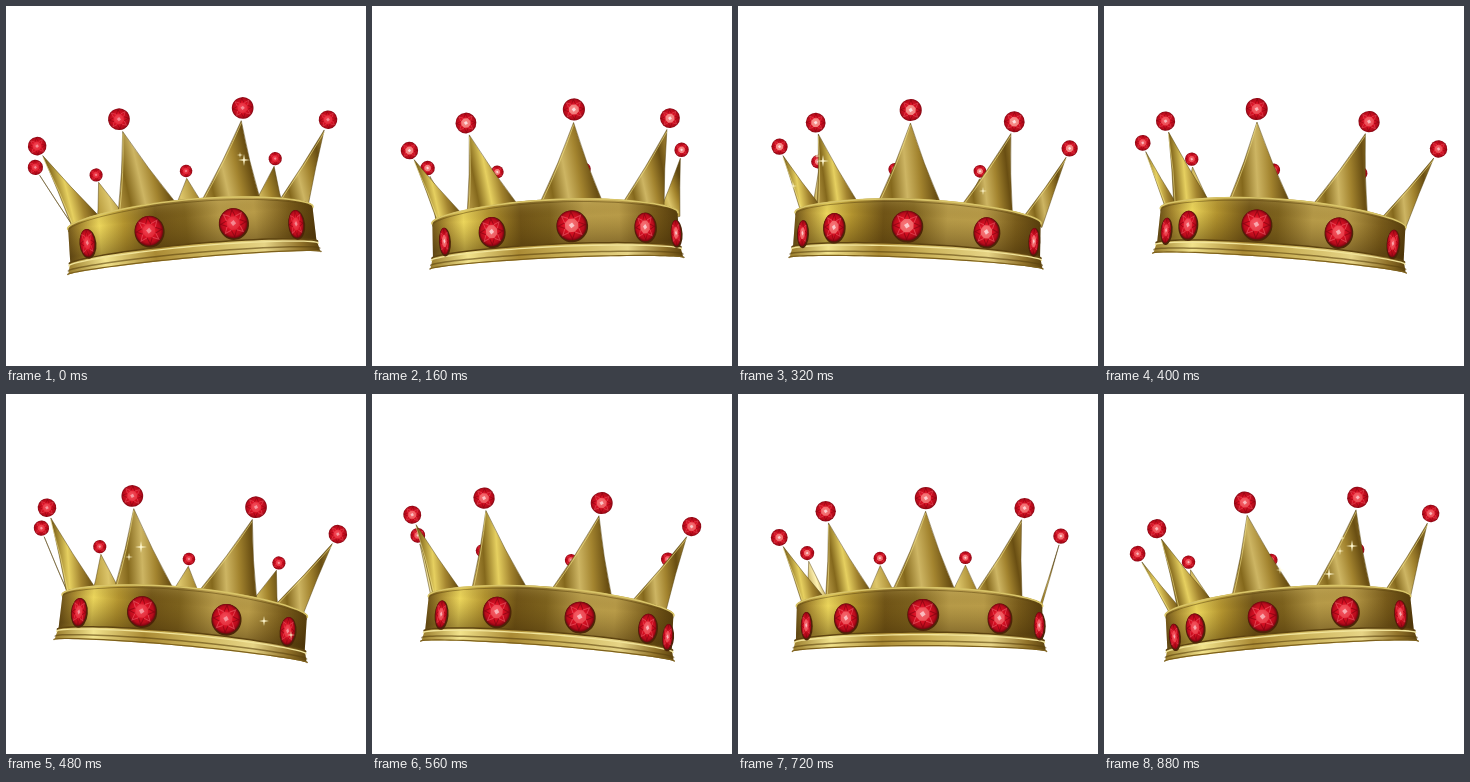
Animation, 360 px wide and 360 px high, one loop 0.96 s. Source, as an HTML page with a canvas:

```html
<!DOCTYPE html>
<html lang="en">
<head>
<meta charset="utf-8">
<title>Turning crown</title>
<style>
html, body { margin: 0; width: 100%; height: 100%; overflow: hidden; background: #fff; }
canvas { display: block; width: 360px; height: 360px; }
</style>
</head>
<body>
<canvas id="stage" width="360" height="360"></canvas>
<script>
const ctx = document.getElementById('stage').getContext('2d');
const STEP = 80, STEPS = 12, CX = 181.5, CY = 181;
const rad = d => d * Math.PI / 180;
const sin = d => Math.sin(rad(d)), cos = d => Math.cos(rad(d));

// [start angle, sweep] during half a loop; 0 faces the viewer
const SPIKES = [[180, 40], [-140, 40], [140, 80], [-100, 40], [60, 40], [-60, 40], [20, 40], [-20, 40]];
const GEMS = [100, 60, 20, -20, -60];
const GLINT = [.1, .35, .7, .7, .75, .4, .2, .5, 1, .6, .5, .4];
const SPARKS = {
  0: [[238, 154, 6], [234, 149, 3]],
  4: [[85, 155, 6], [79, 150, 3], [245, 185, 4], [55, 180, 4]],
  6: [[135, 153, 6], [123, 163, 4], [258, 227, 5], [285, 241, 4]],
  11: [[248, 152, 6], [236, 157, 4], [225, 180, 6], [238, 144, 3], [176, 176, 4]]
};

const near = a => 1 / (1 - .279 * cos(a));

// Point on a ring of the crown, seen from below
function ring(a, y, r, k = .05) {
  return [CX + r * sin(a) / (1 - k * cos(a)), y - .745 * (278 - y) * (near(a) - 1)];
}

function ramp(x0, y0, x1, y1, stops) {
  const g = ctx.createLinearGradient(x0, y0, x1, y1);
  stops.forEach(([at, c]) => g.addColorStop(at, c));
  return g;
}

function arc(y, r, back) {
  for (let i = -92; i <= 92; i += 4) ctx.lineTo(...ring(back ? -i : i, y, r));
}

function line(y, r, color, width) {
  ctx.beginPath();
  arc(y, r);
  ctx.strokeStyle = color;
  ctx.lineWidth = width;
  ctx.stroke();
}

function fillRing(y0, r0, y1, r1, fill) {
  ctx.beginPath();
  arc(y0, r0);
  arc(y1, r1, true);
  ctx.closePath();
  ctx.fillStyle = fill;
  ctx.fill();
}

function polygon(n, r, turn) {
  ctx.beginPath();
  for (let i = 0; i < n; i++) ctx.lineTo(r * cos(i * 360 / n + turn), r * sin(i * 360 / n + turn));
  ctx.closePath();
}

function ruby(x, y, rx, ry, glint, rim) {
  ctx.save();
  ctx.translate(x, y);
  ctx.scale(rx / 10, ry / 10);
  const g = ctx.createRadialGradient(-1, -1, 1, 0, 0, 10);
  g.addColorStop(0, '#ee3044');
  g.addColorStop(.5, '#d60f22');
  g.addColorStop(.82, '#b70c1c');
  g.addColorStop(1, rim);
  ctx.beginPath();
  ctx.arc(0, 0, 10, 0, 7);
  ctx.fillStyle = g;
  ctx.fill();
  ctx.lineWidth = .7;
  for (let i = 0; i < 8; i++) {
    const a = i * 45 + 22;
    ctx.beginPath();
    ctx.moveTo(5 * cos(a), 5 * sin(a));
    ctx.lineTo(9 * cos(a + 22), 9 * sin(a + 22));
    ctx.lineTo(5 * cos(a + 45), 5 * sin(a + 45));
    ctx.strokeStyle = i % 2 ? 'rgba(110,0,12,.5)' : 'rgba(255,120,130,.45)';
    ctx.stroke();
  }
  polygon(8, 4.8, 22);
  ctx.fillStyle = `rgba(255,${100 + 125 * glint},${105 + 95 * glint},${.2 + .6 * glint})`;
  ctx.fill();
  polygon(4, 2, 10);
  ctx.fillStyle = `rgba(255,255,255,${.35 + .5 * glint})`;
  ctx.translate(-1, -1);
  ctx.fill();
  ctx.restore();
}

function spike(a, sway, glint) {
  const back = cos(a) < -.1;
  const ball = ring(a, 143, 156, .15);
  ball[0] += sway * (3 - 11 * sin(a) + (back ? 0 : 3 * cos(a) - 6 * sin(2 * a)));
  ball[1] -= sway * 5.5 * sin(a) ** 3;

  // Spikes at the sides turn their broad face to the viewer
  const side = Math.max(0, 1 - 2 * Math.abs(cos(a)));
  const root = a - Math.sign(a) * 14 * side, half = 14.5 + 6 * side;
  const [l, m, r] = [-half, 0, half].map(d => {
    const q = ring(root + d, 215, 121);
    return [q[0] + sway * (4 - 3 * sin(2 * a)), q[1]];
  });
  const size = 8 * near(a);
  const len = Math.hypot(m[0] - ball[0], m[1] - ball[1]);
  const tip = ball.map((v, i) => v + (m[i] - v) * size * 1.18 / len);
  const bend = q => q.map((v, i) => (v + tip[i]) / 2 * .84 + (m[i] + tip[i]) / 2 * .16);

  ctx.beginPath();
  ctx.moveTo(...l);
  ctx.quadraticCurveTo(...bend(l), ...tip);
  ctx.quadraticCurveTo(...bend(r), ...r);
  ctx.closePath();
  const x0 = Math.min(l[0], r[0], tip[0]), x1 = Math.max(l[0], r[0], tip[0]);
  const mid = (l[1] + tip[1]) / 2;
  const bright = a < -25 && a > -130;
  ctx.fillStyle = ramp(x0, mid + 4, x1, mid - 4, back
    ? [[0, '#a98b2c'], [.4, bright ? '#fff3b4' : '#dcc56a'], [.7, '#a3842c'], [1, '#5f4710']]
    : [[0, '#a98c3a'], [.16, '#84681c'], [.4, bright ? '#e6d060' : '#cdb563'],
       [.62, '#a3842f'], [.85, '#694e12'], [1, '#8f7228']]);
  ctx.fill();
  ctx.lineWidth = .8;
  ctx.strokeStyle = 'rgba(84,65,14,.6)';
  ctx.stroke();
  if (!back) {
    ctx.beginPath();
    ctx.moveTo(l[0] + 1.5, l[1]);
    ctx.quadraticCurveTo(bend(l)[0] + 1.5, bend(l)[1], tip[0], tip[1] + 2);
    ctx.strokeStyle = 'rgba(240,225,140,.75)';
    ctx.stroke();
  }
  ruby(...ball, size, size, glint, '#840713');
}

function band() {
  fillRing(212, 123, 250, 124, ramp(58, 0, 305, 0, [
    [0, '#70551a'], [.05, '#a5872f'], [.13, '#ecd65c'], [.23, '#b3942f'], [.36, '#6f5316'],
    [.48, '#7c611d'], [.62, '#b69a48'], [.76, '#b89b48'], [.9, '#775a1a'], [1, '#553c0c']]));
  fillRing(212, 123, 250, 124, ramp(0, 190, 0, 252, [
    [0, 'rgba(255,235,150,.3)'], [.35, 'rgba(90,64,10,0)'], [.8, 'rgba(62,40,4,.38)'], [1, 'rgba(62,40,4,.2)']]));
  line(212.5, 123, '#d9c568', 1.6);
  line(214.5, 122.5, 'rgba(92,68,15,.5)', 1);
  fillRing(247, 124.5, 258, 127, ramp(55, 0, 309, 0, [
    [0, '#9a7d2c'], [.15, '#f2e38c'], [.35, '#aa8a34'], [.55, '#cdb55c'],
    [.78, '#e6d486'], [.92, '#92732a'], [1, '#5a400c']]));
  line(247, 124.5, '#5e4410', 1.5);
  line(249, 125, '#f1e49a', 1.3);
  line(254, 126, 'rgba(92,68,14,.6)', 1.5);
  line(257.5, 127, '#7d601c', 1.2);
}

function spark(x, y, r) {
  ctx.beginPath();
  for (let i = 0; i < 8; i++) {
    const d = i % 2 ? r * .2 : r;
    ctx.lineTo(x + d * cos(i * 45), y + d * sin(i * 45));
  }
  ctx.closePath();
  ctx.fillStyle = '#fff8cf';
  ctx.fill();
}

function draw(n) {
  const p = n % 6 / 6, glint = GLINT[n];
  const sway = 1.1 * Math.sin(Math.PI * p ** 1.25);
  ctx.clearRect(0, 0, 360, 360);
  ctx.save();
  ctx.translate(CX, CY);
  ctx.rotate(rad(-5.2 * cos(n * 30)));
  ctx.translate(-CX, -CY);
  SPIKES.map(([a, sweep]) => a - sweep * p)
    .sort((a, b) => cos(a) - cos(b))
    .forEach(a => spike(a < -180 ? a + 360 : a, sway, glint));
  band();
  for (const start of GEMS) {
    const a = start - 40 * p;
    if (Math.abs(a) > 95) continue;
    const [x, y] = ring(a, 233, 118);
    const rx = Math.max(5, 15 * cos(a)), ry = 12.8 + 2.2 * cos(a);
    const gx = x + sway * (3 - 2 * sin(2 * a));
    ctx.beginPath();
    ctx.ellipse(gx + .5, y + 1, rx + 1, ry + 1, 0, 0, 7);
    ctx.fillStyle = '#4c2508';
    ctx.fill();
    ruby(gx, y, rx, ry, glint * .75, '#76040f');
  }
  ctx.restore();
  (SPARKS[n] || []).forEach(s => spark(...s));
}

let shown = -1;
function tick() {
  const n = Math.floor(performance.now() / STEP) % STEPS;
  if (n !== shown) draw(shown = n);
  requestAnimationFrame(tick);
}
tick();
</script>
</body>
</html>
```
